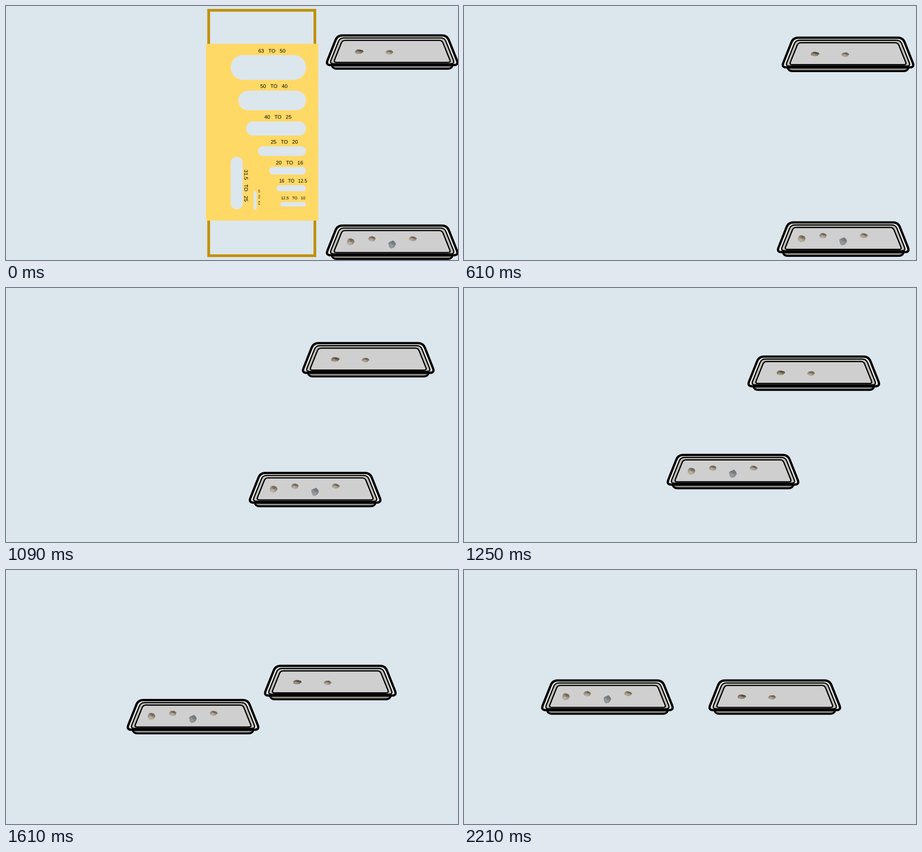
Write an HTML page that moves like this. It is 998x561 px and loops after 2250 ms.

```html
<!DOCTYPE html>
<html lang="en">
<head>
<meta charset="utf-8">
<title>Sorting gauge and trays</title>
<style>
  html, body { margin: 0; width: 100%; height: 100%; overflow: hidden; background: #dce6ed; }
  svg { display: block; width: 100%; height: 100%; }
  text { font-family: "Liberation Sans", Arial, sans-serif; text-anchor: middle; white-space: pre; }
</style>
</head>
<body>
<svg viewBox="0 0 998 561">
  <g id="gauge">
    <rect x="447.5" y="9.5" width="234.5" height="542" fill="none" stroke="#bf9000" stroke-width="6"/>
    <rect x="441.5" y="83.5" width="248" height="390.5" fill="#ffd966"/>
  </g>
  <g id="upper"></g>
  <g id="lower"></g>
</svg>
<script>
const LOOP = 2250, HOLD = 290, STEP = 40;
const BACKGROUND = "#dce6ed";
const [gauge, upper, lower] = ["gauge", "upper", "lower"].map(id => document.getElementById(id));

function add(parent, tag, attrs, content = "") {
  const node = document.createElementNS("http://www.w3.org/2000/svg", tag);
  for (const name in attrs) node.setAttribute(name, attrs[name]);
  node.textContent = content;
  parent.append(node);
}

// A slot is as thick as the mean of the two sizes it sorts.
const thickness = (from, to) => 0.985 * (from + to) / 2 - 1;

function slot(x, y, width, height) {
  add(gauge, "rect", { x, y, width, height, rx: Math.min(width, height) / 2, fill: BACKGROUND });
}

function label(from, to, x, y, size, turn = 0) {
  const transform = `translate(${x} ${y}) rotate(${turn})`;
  add(gauge, "text", { transform, "font-size": size }, [from, "TO", to].join("\u00a0\u00a0\u00a0"));
}

function row(from, to, left, top, labelX, size = 11.4) {
  slot(left, top, 662.5 - left, thickness(from, to));
  label(from, to, labelX, top - 6, size);
}

function column(from, to, left, top, bottom, size) {
  const width = thickness(from, to);
  slot(left, top, width, bottom - top);
  label(from, to, left + width + 3, bottom - 4.5 * size, size, 90);
}

// Rounded trapezoid, symmetric about x = 145.
function trapezoid(top, topHalf, bottom, bottomHalf, radius) {
  const corners = [[145 - topHalf, top], [145 + topHalf, top], [145 + bottomHalf, bottom], [145 - bottomHalf, bottom]];
  const toward = ([x, y], [u, v]) => {
    const k = radius / Math.hypot(u - x, v - y);
    return [x + (u - x) * k, y + (v - y) * k];
  };
  return corners.map((corner, i) => {
    const before = toward(corner, corners[(i + 3) % 4]);
    const after = toward(corner, corners[(i + 1) % 4]);
    return `${i ? "L" : "M"}${before}Q${corner} ${after}`;
  }).join("") + "Z";
}

function drawTray(tray) {
  const shape = (d, fill, width) => add(tray, "path", { d, fill, stroke: "#000", "stroke-width": width });
  shape(trapezoid(62, 136, 76.7, 131, 8), "#8d8e87", 4.2);
  ["#e4e4df", "#bdbdba", "#d0cfcf"].forEach((fill, i) => {
    const k = i / 2;
    const d = trapezoid(3 + 11 * k, 121 - 11 * k, 68.5 - 6 * k, 147 - 17.5 * k, 11 - 5 * k);
    shape(d, fill, i ? 2.7 : 5);
  });
}

function seededRandom(seed) {
  return () => (seed = (seed * 16807) % 2147483647) / 2147483647;
}

// Facets fan out from a hub; those that face up and right are darkest.
function stone(tray, x, y, width, height, tone, hue = 36, contrast = 15) {
  const random = seededRandom(Math.round(x * 71 + y * 13));
  const count = 8;
  const rim = Array.from({ length: count }, (_, i) => {
    const angle = (i + 0.5 * random()) * 2 * Math.PI / count;
    const reach = 0.44 + 0.1 * random();
    return [x + width * reach * Math.cos(angle), y + height * reach * Math.sin(angle)];
  });
  const hub = [x + width * 0.06, y - height * 0.04];
  rim.forEach((point, i) => {
    const facing = Math.cos((i + 0.75) * 2 * Math.PI / count + Math.PI / 3);
    const fill = `hsl(${hue} ${hue > 100 ? 4 : 12}% ${tone - contrast * facing}%)`;
    add(tray, "polygon", { points: [hub, point, rim[(i + 1) % count]].join(" "), fill, stroke: fill, "stroke-width": 0.5 });
  });
}

row(63, 50, 496, 108.5, 587);
row(50, 40, 513, 187, 591.5);
row(40, 25, 530, 255, 600.5);
row(25, 20, 556, 310, 614.5);
row(20, 16, 581, 355.5, 626);
row(16, 12.5, 597.5, 396, 634, 10.1);
row(12.5, 10, 605.5, 433, 634, 8.8);
column(31.5, 25, 496, 333, 449, 11.6);
column(10, 6.3, 546.5, 409, 450, 6.2);

drawTray(upper);
stone(upper, 72, 39, 21, 10, 42);
stone(upper, 139, 40, 17, 10, 50);
drawTray(lower);
stone(lower, 53, 39, 17, 15, 54);
stone(lower, 100.5, 32, 16, 12, 52);
stone(lower, 144.5, 45, 17, 18, 53, 200, 7);
stone(lower, 190.5, 32, 17, 11, 51);

const clamp = v => Math.max(0, Math.min(1, v));
const easeInOut = u => u < 0.5 ? 2 * u * u : 1 - 2 * (1 - u) ** 2;

function place(tray, x, y, dx, dy, p) {
  tray.setAttribute("transform", `translate(${x + dx * p} ${y + dy * p})`);
}

function draw(ms) {
  const t = ms < HOLD ? 0 : HOLD + STEP * Math.floor((ms - HOLD) / STEP);
  const p = easeInOut(clamp((t - 404) / 1722));
  gauge.setAttribute("opacity", 1 - clamp((t - 270) / 300));
  place(upper, 707.7, 62, -166.5, 179, p);
  place(lower, 707.7, 482, -536, -241, p);
}

const start = performance.now();
function tick() {
  draw((performance.now() - start) % LOOP);
  requestAnimationFrame(tick);
}
tick();
</script>
</body>
</html>
```
